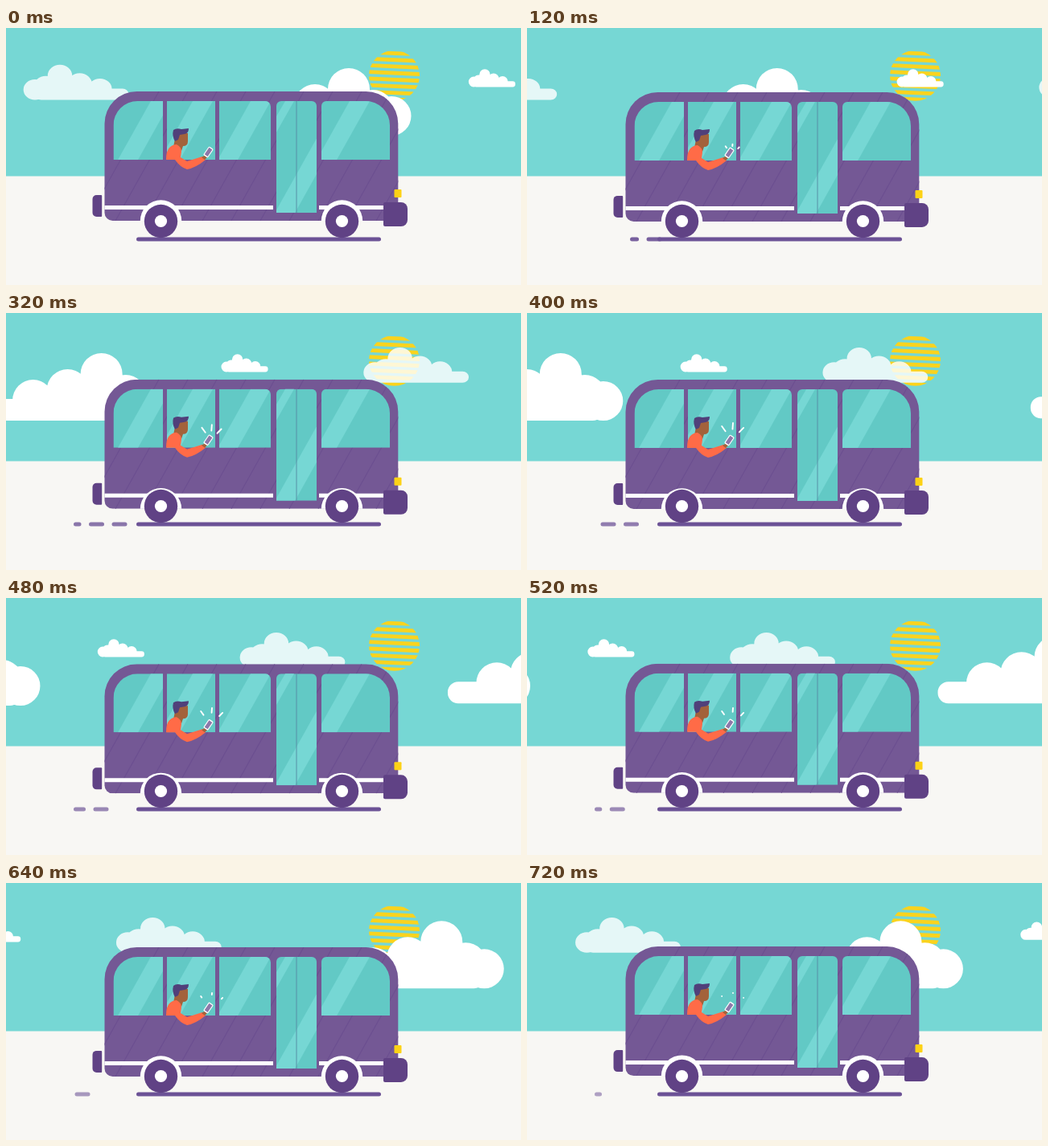
Recreate the animation shown at these times as an HTML page with a canvas. Size 640x320 px, loop 760 ms.

```html
<!DOCTYPE html>
<html>
<head>
<meta charset="utf-8">
<style>
html, body { margin: 0; width: 100%; height: 100%; overflow: hidden; }
canvas { display: block; }
</style>
</head>
<body>
<canvas id="stage" width="640" height="320"></canvas>
<script>
const ctx = document.getElementById('stage').getContext('2d');
const LOOP = 760, STEP = 40, WRAP = 730;
const SKY = '#76d7d4', GLASS = '#62c9c5', GROUND = '#f8f7f4', BODY = '#745895',
  DARK = '#604285', SHADOW = '#6c5296', YELLOW = '#fad31e', ORANGE = '#ff6b47',
  SKIN = '#a3623b', HAIR = '#50407a', WHITE = '#fff';
const WHEELS = [192.5, 417.5];

const clamp = v => Math.max(0, Math.min(1, v));

function box(color, x, y, w, h, radii = 0) {
  ctx.fillStyle = color;
  ctx.beginPath();
  ctx.roundRect(x, y, w, h, radii);
  ctx.fill();
}

function disc(color, x, y, r, start = 0, end = 2 * Math.PI) {
  ctx.fillStyle = color;
  ctx.beginPath();
  ctx.arc(x, y, r, start, end);
  ctx.fill();
}

function shape(color, path) {
  ctx.fillStyle = color;
  ctx.fill(new Path2D(path));
}

function line(color, width, x1, y1, x2, y2) {
  ctx.strokeStyle = color;
  ctx.lineWidth = width;
  ctx.beginPath();
  ctx.moveTo(x1, y1);
  ctx.lineTo(x2, y2);
  ctx.stroke();
}

// Runs draw inside a rounded clip, then restores the context.
function clipped(x, y, w, h, radii, draw) {
  ctx.save();
  ctx.beginPath();
  ctx.roundRect(x, y, w, h, radii);
  ctx.clip();
  draw();
  ctx.restore();
}

// All clouds share one outline: rounded columns on a flat base, peak at x = 0.
const cloud = new Path2D();
cloud.roundRect(-146, -27, 199, 27, 13);
for (const [x, top] of [[-85, 51], [-42, 64], [0, 84], [30, 57], [53, 49]]) {
  const r = Math.min(26, top / 2);
  cloud.roundRect(x - r, -top, 2 * r, top, r);
}

function drawCloud(x, y, scaleX, scaleY, t, alpha = 1) {
  for (const copy of [0, 1]) {
    ctx.save();
    ctx.translate(x + WRAP * (copy - t / LOOP), y - 2.7 * copy);
    ctx.scale(scaleX, scaleY);
    ctx.globalAlpha = alpha;
    ctx.fillStyle = WHITE;
    ctx.fill(cloud);
    ctx.restore();
  }
}

function drawSun() {
  clipped(451, 27.8, 63, 63, 31.5, () => {
    ctx.translate(482.5, 59.3);
    ctx.rotate(0.045);
    for (let y = -30.2; y < 32; y += 8.2) box(YELLOW, -34, y, 68, 4.8);
  });
}

function drawTrail(t) {
  box(SHADOW, 162, 260.5, 304, 5, 2.5);
  const shift = t < 240 ? 0.283 * t : 68 + 0.1437 * (t - 240);
  ctx.globalAlpha = 1 - 0.5 * t / LOOP;
  for (let i = 0; i < 3; i++) {
    const right = 173 + 28.5 * i - shift;
    const left = Math.max(84, right - (i ? 19 : 11));
    if (left < 162 && right > left + 3) box(SHADOW, left, 260.5, right - left, 5, 2.5);
  }
  ctx.globalAlpha = 1;
}

// A pane of glass with a slanted highlight starting at shineX on top.
function pane(x, w, h, radii, shineX) {
  clipped(x, 91, w, h, radii, () => {
    box(GLASS, x, 91, w, h);
    shape(SKY, `M${shineX} 91h25l${-0.56 * h} ${h}h-25z`);
  });
}

function drawPassenger() {
  shape(SKIN, 'M210 138L215 131L226 131V141Q226 147 220 147L218 153L208 148Z');
  shape(HAIR, 'M210 141Q206 134 208 127Q212 124 218 126L227 125Q227 131 222 132L216 133L214 139Z');
  shape(ORANGE, 'M199 164Q199 153 203 149Q207 145 212 145Q218 148 218 154L217 161L225 166L244 160L248 164Q236 174 225 176Q216 173 210 164Z');
  shape(SKIN, 'M243 161L248 158L251 160L247 164Z');
  ctx.save();
  ctx.translate(251.5, 154.5);
  ctx.rotate(0.6);
  box(WHITE, -3.5, -6.5, 7, 13, 1.5);
  box('#8d78a9', -2.4, -5.2, 4.8, 10.2);
  ctx.restore();
}

function drawBus() {
  box(DARK, 107.5, 208, 11.7, 27, [5, 1, 1, 5]);
  clipped(122.5, 79, 364.8, 161, [40, 40, 10, 10], () => {
    box(BODY, 122, 79, 366, 161);
    for (let x = 190; x < 600; x += 36) line('#6c4f90', 1.2, x, 79, x - 90, 240);
  });

  pane(133.5, 61.5, 73, [30, 0, 0, 0], 180);
  pane(200, 60, 73, 0, 232);
  pane(265, 64, 73, [0, 7, 0, 0], 304);
  pane(392, 85, 73, [6, 30, 0, 0], 427);
  pane(336, 50, 139, [6, 6, 0, 0], 412);
  shape(SKY, 'M347 91H358L336 130V110Z');
  line('#5690a6', 1, 361, 91, 361, 230);

  box(WHITE, 122.5, 221, 209.5, 5);
  box(WHITE, 389, 221, 80, 5);
  for (const x of WHEELS) disc(WHITE, x, 240, 25.7, Math.PI);
  box(DARK, 469, 217, 30, 30, [2, 8, 8, 2]);
  box('#fdd216', 482.5, 201, 9, 10, 1);
  drawPassenger();
}

// Three rays fan out from the phone, then shrink to their tips.
function drawSparks(t) {
  const head = 11 + 10 * clamp((t - 40) / 360), tail = 11 + 10 * clamp((t - 300) / 420);
  if (t <= 40) return;
  ctx.lineCap = 'round';
  for (let i = -1; i <= 1; i++) {
    const dx = Math.sin(0.7 * i + 0.07), dy = -Math.cos(0.7 * i + 0.07);
    line(WHITE, 1.9, 254.5 + dx * tail, 158 + dy * tail, 254.5 + dx * head + 0.01, 158 + dy * head);
  }
  ctx.lineCap = 'butt';
}

function draw(t) {
  box(GROUND, 0, 0, 640, 320);
  box(SKY, 0, 0, 640, 184.5);
  drawSun();
  drawCloud(67, 89.5, -0.585, 0.52, t, 0.81);
  drawCloud(426, 134, 1, 1, t);
  drawCloud(595, 73.5, -0.26, 0.265, t);
  drawTrail(t);

  ctx.save();
  ctx.translate(0, 2 - 2 * Math.cos(2 * Math.PI * t / LOOP));
  drawBus();
  ctx.restore();

  for (const x of WHEELS) {
    disc(DARK, x, 240.5, 20.7);
    disc(WHITE, x, 240.5, 7.6);
  }
  drawSparks(t);
}

function tick() {
  draw(Math.floor(performance.now() % LOOP / STEP) * STEP);
  requestAnimationFrame(tick);
}
tick();
</script>
</body>
</html>
```
